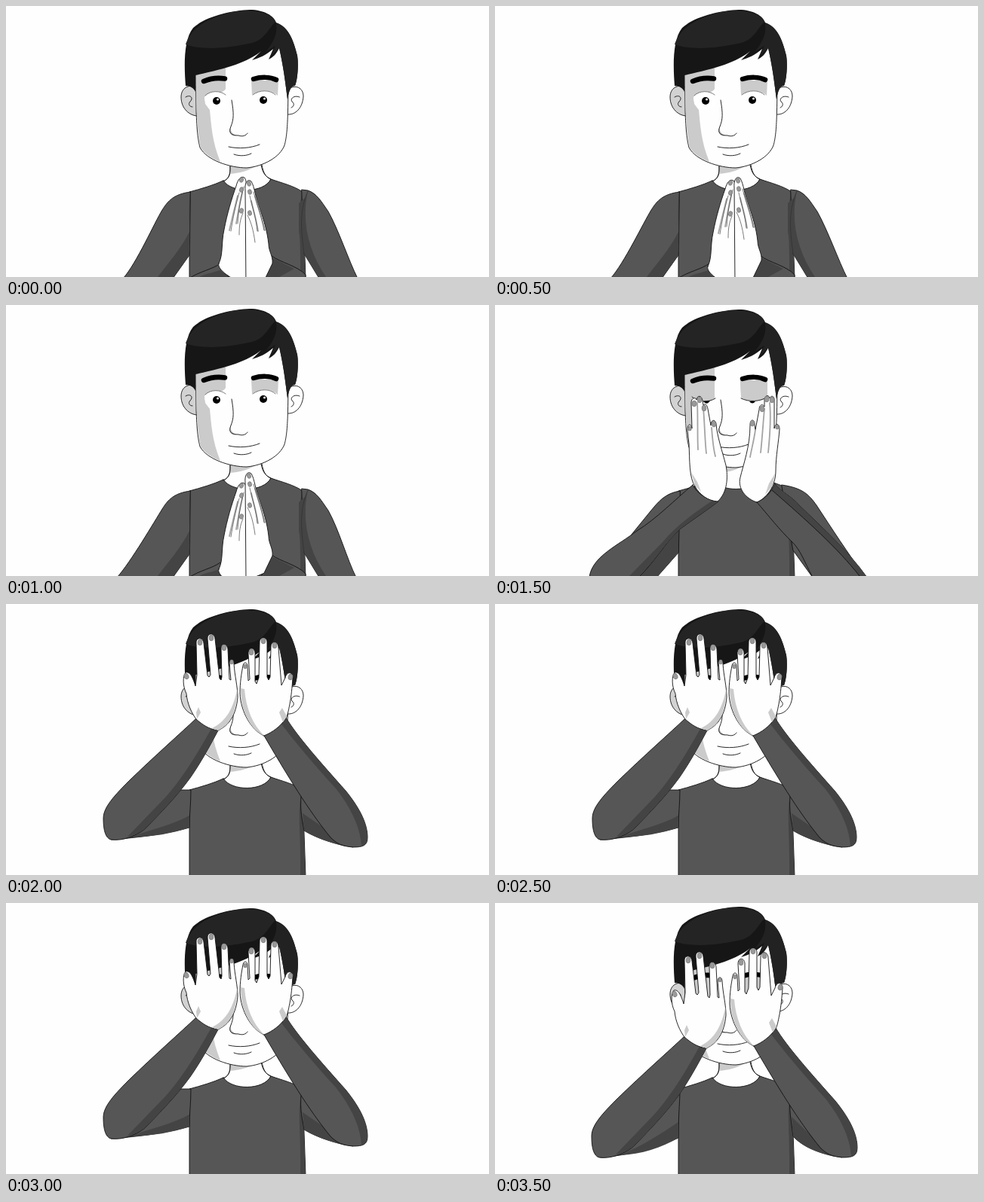
Recreate the animation shown at these times as an HTML page. Size 640 by 360 pixels, loop 4 s.

```html
<!DOCTYPE html>
<html lang="en">
<head>
<meta charset="utf-8">
<title>Palming</title>
<style>
html, body { margin: 0; width: 100%; height: 100%; overflow: hidden; background: #fefefe; }
svg { display: block; width: 100vw; height: 100vh; }
path { stroke-linecap: round; stroke-linejoin: round; }
.skin { fill: #fefefe; stroke: #111; stroke-width: .9; }
.cloth { fill: #565656; stroke: #111; stroke-width: .9; }
.fold { fill: #444; }
.shade { fill: #cbcbcb; }
.line { fill: none; stroke: #111; stroke-width: .9; }
.seam { fill: none; stroke: #333; stroke-width: .8; }
.thin { fill: none; stroke: #444; stroke-width: .7; }
.soft { fill: none; stroke: #a4a4a4; stroke-width: 1.8; }
.nail { fill: #999; stroke: #666; stroke-width: .5; }
.brow { fill: none; stroke: #000; stroke-width: 6.5; }
</style>
</head>
<body>
<svg viewBox="0 0 640 360">
  <rect width="640" height="360" fill="#fefefe"/>
  <g id="neck">
    <path class="skin" stroke="none" d="M297 205 L297 217 C297 226 294 230 288 233 C298 250 342 250 351 230 C343 227 340 220 338 205Z"/>
    <path class="shade" d="M298 208 L332 212 C322 219 309 222 297 223Z"/>
    <path class="line" d="M297 213 C298 225 294 230 288 233 M338 211 C340 222 344 227 351 230"/>
  </g>
  <g id="torso">
    <path class="cloth" d="M288 232 C275 238 258 243 243 247 L243 362 L397 362 L393 247 C382 239 365 235 351 230 C341 249 299 249 288 232Z"/>
    <path class="fold" d="M393 248 C385 270 391 300 390 360 L397 360 L394 290Z"/>
  </g>
  <g id="sleeves"></g>
  <g id="head">
    <path class="skin" style="fill:#d2d2d2" d="M253 108 C242 103 232 109 232 121 C232 136 243 146 254 146Z"/>
    <path class="line" d="M238 121 C244 117 249 122 244 127 C241 130 243 134 247 134"/>
    <path class="skin" d="M373 111 C384 103 394 109 394 120 C393 135 384 145 373 144Z"/>
    <path class="line" d="M389 121 C382 118 376 123 379 127 C383 130 381 134 378 135"/>
    <path class="skin" d="M251 40 L252 140 C253 165 254 176 257 188 C266 205 297 215 319 215 C341 213 363 201 369 185 C374 167 374 140 374 40Z"/>
    <path class="shade" d="M251.500 85 L291 78 L291 110 C288 117 270 116 263 122 C264 132 268 135 270 138 C272 158 273 180 284 207 C273 203 263 196 258 188 C254 170 252 140 251.500 85Z"/>
    <path class="shade" d="M325 99 L361 99 L360 119 C350 110 336 111 326 118Z"/>
    <g id="open">
      <path fill="#fff" d="M263 121 C270 111 285 112 290 119 L291 133 C280 138 268 137 264 130Z"/>
      <path class="thin" d="M264 119 C271 112 284 112 291 118 M327 118 C336 111 350 111 357 118"/>
      <circle cx="279" cy="126" r="5"/><circle cx="341" cy="125" r="5"/>
      <circle cx="280.500" cy="124" r="1.500" fill="#fff"/><circle cx="342.500" cy="123" r="1.500" fill="#fff"/>
    </g>
    <g id="shut">
      <path class="shade" d="M260 101 L291 98 L291 123 C283 129 267 128 260 121Z M325 99 L361 99 L361 122 C351 128 334 128 326 122Z"/>
      <path class="line" d="M261 121 C268 128 283 129 292 123 M326 123 C336 128 351 128 361 121"/>
      <path d="M276 127 Q281 133 285 126Z M337 127 Q341 132 345 127Z"/>
    </g>
    <path class="brow" d="M262 100 C270 96.500 280 95 290 96.500 M328 97 C338 94 350 94 358 98"/>
    <path fill="#bcbcbc" d="M299 158 C296 164 298 169 306 173 L300 172 C295 169 296 163 299 158Z"/>
    <path class="line" d="M299 125 C302 143 302 150 298 160 C294 169 299 172 308 172 C314 174 318 172 320 169 M295 187 C308 190 324 189 336 184 M302 197 C310 200 319 199 325 196"/>
    <path fill="#161616" d="M251 114 C249 109 244 106 238 106 C236 80 235 45 248 29 C264 14 298 6 323 5 C342 5 355 13 358 22 C375 28 381 46 386 66 C388 80 386 99 383 106 C377 106 375 113 373 124 L370 101 C368 85 365 69 362 56 C358 64 354 68 348 71 L354 57 C345 65 336 69 326 72 L338 60 C320 75 292 83 251 92Z"/>
    <path fill="#242424" d="M238 51 C246 28 266 17 299 8 C323 4 350 7 357 21 C348 29 344 44 326 49 C300 55 262 60 238 51Z"/>
    <path fill="#222" d="M358 23 C375 28 381 46 386 66 C388 80 386 99 383 106 C377 106 375 113 373 124 L370 101 C368 85 365 69 362 56 L351 66 L357 53 L345 60 C354 48 360 38 358 23Z"/>
  </g>
  <g id="arms"></g>
</svg>
<script>
const $ = id => document.getElementById(id);
const p = (cls, d) => `<path class="${cls}" d="${d}"/>`;
const nails = list => list.map(([x, y, a = 0, r = 3]) =>
  `<ellipse class="nail" cx="${x}" cy="${y}" rx="${r}" ry="${r * 1.3}" transform="rotate(${a} ${x} ${y})"/>`).join('');
const move = (x, y, s) => `<g transform="translate(${x} ${y})">${s}</g>`;

// Palms together: elbows spread to l and r, hands slide by dl and dr.
function pray(l, r, dl, dr) {
  const sleeves =
    p('cloth', `M244 247 C223 250 215 258 207 271 C197 287 ${l + 18} 342 ${l} 362 L221 362 L243 331Z`) +
    p('fold', 'M243 300 C233 321 213 344 201 360 L222 360 L243 331Z') +
    p('cloth', `M392 244 L400 245 C412 249 418 260 427 273 C441 298 ${r - 12} 338 ${r} 362 L415 362 L395 329Z`) +
    p('fold', 'M400 246 C387 274 391 305 393 326 L414 360 L424 360 C401 326 391 286 400 246Z') +
    p('fold', 'M388 262 L396 255 L393 329 L388 300Z') +
    p('seam', 'M244 250 C242 280 245 310 243 331 M400 246 C387 274 392 305 395 329');
  const cuffs =
    p('cloth', 'M242 362 C258 352 273 350 284 342 L296 362Z') +
    p('fold', 'M256 360 C268 354 278 354 287 349 L294 360Z') +
    p('cloth', 'M352 332 C364 341 386 345 397 357 L397 362 L338 362Z') +
    p('fold', 'M352 334 L382 349 L362 360 L340 360Z');
  const left = p('skin', 'M282 342 C288 330 285 315 289 297 C293 276 299 256 305 239 C307 231 311 225 316 228 C319 232 318 237 318 242 L319 375 L291 356 C286 352 280 346 282 342Z') +
    p('soft', 'M307 252 C303 268 300 280 296 298 M314 243 C310 259 308 272 305 289') +
    p('thin', 'M309 248 C304 266 301 280 298 299 M315 240 C311 258 308 270 307 289 M314 275 C310 284 309 292 309 304') +
    nails([[312, 231, 22, 2.600], [312, 244, 18, 2.600], [312, 272, 16, 2.600]]);
  const right = p('skin', 'M318 375 L317 245 C316 235 320 229 325 233 C329 239 331 256 336 269 C342 285 346 299 348 316 C348 326 354 332 353 342 L342 365Z') +
    p('soft', 'M330 253 C335 270 340 282 343 298 M325 259 C328 273 332 284 334 299') +
    p('thin', 'M328 247 C333 266 338 278 342 298 M323 252 C327 270 331 280 333 299 M320 278 C325 287 328 299 330 314') +
    nails([[322, 236, -18, 2.600], [323, 247, -12, 2.600], [323, 275, -12, 2.600]]);
  return [sleeves, cuffs + move(0, dl, left) + move(0, dr, right)];
}

function cheeks() {
  const sleeves =
    p('cloth', 'M245 247 C225 250 216 262 206 274 L180 306 L190 362 L214 362 L243 329Z') +
    p('fold', 'M243 300 L190 362 L214 362 L243 329Z') +
    p('cloth', 'M380 239 C408 243 416 252 426 266 C447 298 467 329 491 362 L421 362 L395 326Z');
  const left =
    p('cloth', 'M262 239 C239 258 214 284 188 300 C164 319 128 334 125 362 L190 362 C211 342 226 315 246 297 C268 281 283 271 296 261 C281 259 268 251 262 239Z') +
    p('fold', 'M288 260 C264 276 240 293 222 315 L178 360 L191 360 C211 342 226 315 246 297 C268 281 283 271 296 261Z') +
    p('skin', 'M265 241 C257 230 258 205 257 184 L255 166 C255 157 260 157 261 164 L260 130 C260 123 266 122 267 126 C268 119 274 120 275 127 L276 133 C279 130 281 133 282 138 L286 160 C286 152 292 151 293 158 C294 173 301 194 306 213 C309 229 308 249 295 261 C282 260 271 252 265 241Z') +
    p('shade', 'M260 222 L268 235 L273 248 L265 240Z') +
    p('soft', 'M268 130 C269 150 268 172 269 192 M276 137 C278 160 278 179 280 197 M287 163 C288 176 289 190 292 201') +
    nails([[264, 131], [271, 126], [277, 137], [290, 158, -10], [258, 164, 0, 2.400]]);
  const right =
    p('cloth', 'M371 238 C380 249 393 254 403 266 C435 297 470 329 493 362 L421 362 C409 339 405 326 394 315 C378 300 361 278 347 262 C357 258 366 249 371 238Z') +
    p('fold', 'M371 238 C382 250 393 254 403 266 C435 297 470 329 492 360 L483 360 C454 323 413 286 367 246Z') +
    p('line', 'M367 246 C413 286 454 323 483 360') +
    p('skin', 'M347 262 C333 258 321 244 325 229 C329 212 338 188 338 160 C338 151 344 151 344 159 L345 166 L350 139 C350 132 355 131 357 135 L357 126 C358 119 363 119 364 124 C366 119 371 121 370 128 L370 164 C371 156 377 157 377 165 C376 181 372 201 372 220 C372 242 359 257 347 262Z') +
    p('shade', 'M371 224 L363 237 L358 252 L368 240Z') +
    p('soft', 'M345 166 C343 180 340 191 338 202 M357 138 C355 160 354 178 352 196 M364 130 C366 150 364 176 362 196') +
    nails([[367, 126], [360, 125], [354, 138], [341, 157, 10], [374, 162, 0, 2.400]]);
  return [sleeves, left + right];
}

// Palms over the eyes, each side shifted down by l and r.
function cover(l, r) {
  const sleeves =
    p('cloth', `M228 247 L245 247 C245 265 243 280 243 ${297 + l * .6} C215 ${305 + l * .8} 180 ${310 + l} 140 ${313 + l}Z`) +
    p('fold', `M243 ${281 + l * .4} C220 ${294 + l * .5} 195 ${298 + l} 165 ${310 + l} C195 ${309 + l} 220 ${305 + l * .8} 243 ${297 + l * .6}Z`) +
    p('cloth', `M392 244 L440 ${270 + r} L460 ${323 + r} C430 ${318 + r} 408 ${309 + r} 395 ${301 + r * .6} C391 280 389 270 392 244Z`) +
    p('fold', `M393 ${278 + r * .4} L425 ${300 + r} L450 ${322 + r} C427 ${317 + r} 408 ${309 + r} 395 ${301 + r * .6}Z`);
  const left =
    p('cloth', 'M252 152 C231 172 199 200 162 236 C139 259 129 272 129 285 C129 301 132 311 139 313 C154 315 171 309 184 299 C205 277 225 257 244 231 C258 211 271 187 281 168Z') +
    p('fold', 'M273 164 C255 196 236 229 211 257 L161 309 C171 307 178 303 184 299 C205 277 225 257 244 231 C258 211 271 187 281 168Z') +
    p('skin', 'M252 153 C246 145 240 132 239 119 C234 109 234 96 238 91 C244 89 248 99 251 109 L253 94 L252 51 C252 44 261 44 262 52 L267 95 L269 97 L271 94 L267 46 C267 38 276 38 277 46 L283 99 L285 101 L286 97 L285 59 C285 51 293 52 294 60 L296 100 L298 101 L296 78 C297 72 302 73 302 79 C303 96 307 109 307 124 C305 147 296 161 281 168 C268 166 260 160 252 153Z') +
    p('shade', 'M306.500 113 C301 138 293 155 273 165 L281 168 C296 161 306 145 306.500 113Z M252 144 L255 137 L258 144 L253 153Z') +
    nails([[257, 51], [272, 45], [289, 58], [299, 77, 0, 2.300], [239, 96, -20]]);
  const right =
    p('cloth', 'M371 151 C385 175 419 213 450 248 C471 274 479 294 479 310 C479 321 473 323 460 323 C445 322 438 318 430 310 C407 282 382 244 342 175Z') +
    p('fold', 'M371 151 C385 175 419 213 450 248 C471 274 479 294 479 310 C478 318 475 321 471 322 C470 297 456 269 437 245 C405 210 382 182 363 157Z') +
    p('skin', 'M342 175 C325 168 311 143 310 119 C310 104 312 92 314 82 C315 76 320 77 320 83 L321 102 L323 100 L321 66 C321 57 329 57 330 65 L330 103 L332 106 L335 98 L336 51 C336 43 346 43 346 51 L346 97 L348 101 L350 97 L351 57 C351 48 361 49 361 58 L365 108 L370 98 C372 89 380 90 380 98 C379 112 378 122 376 133 C374 143 373 148 371 152 C363 163 354 170 342 175Z') +
    p('shade', 'M311 112 C311 143 324 167 342 175 C327 160 318 139 316 113Z M362 144 L366 138 L372 149 L367 157Z') +
    nails([[325, 64], [341, 49], [356, 55], [317, 83, 0, 2.300], [377, 97, 15]]);
  return [sleeves, move(l ? -1 : 0, l, left) + move(r ? 1 : 0, r, right)];
}

const closed = cover(0, 0);
const poses = [
  pray(155, 466, 0, 0), pray(153, 467, 4, -4), pray(147, 464, 9, -9),
  cheeks(), closed, closed, closed, cover(25, 15)
];
const dip = [0, 0, 0, 1, 2, 2, 2, 0];
let shown = -1;

function draw(ms) {
  const i = Math.floor(ms % 4000 / 500);
  if (i !== shown) {
    shown = i;
    [$('sleeves').innerHTML, $('arms').innerHTML] = poses[i];
    $('head').setAttribute('transform', `translate(0 ${dip[i]})`);
    $('open').style.display = i < 3 ? '' : 'none';
    $('shut').style.display = i < 3 ? 'none' : '';
  }
}

const start = performance.now();
function tick() {
  draw(performance.now() - start);
  requestAnimationFrame(tick);
}
tick();
</script>
</body>
</html>
```
